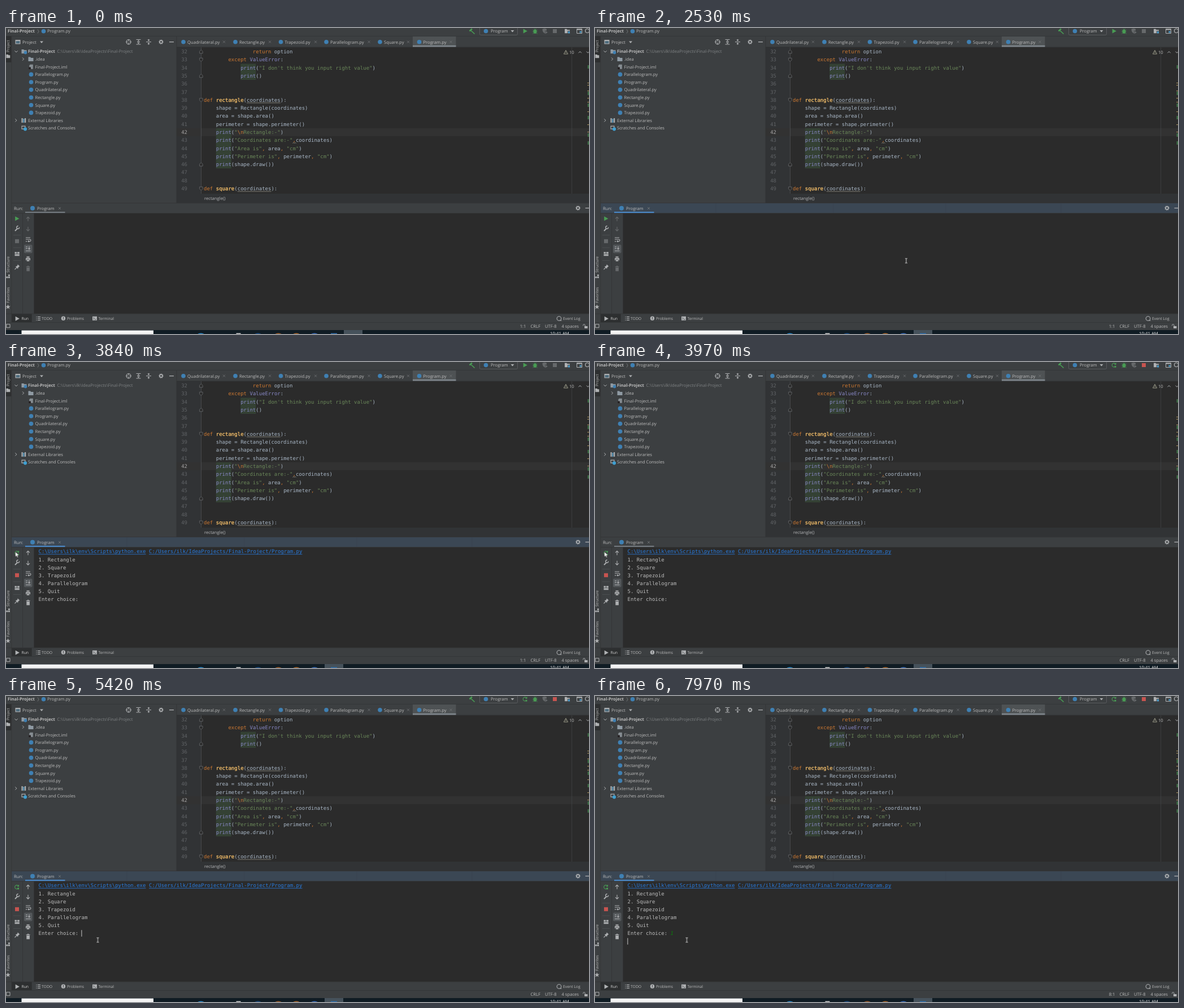
These frames come from a looping animation (1032 px wide and 543 px high, 8000 ms). An HTML page:

```html
<!DOCTYPE html>
<html lang="en">
<head>
<meta charset="utf-8">
<title>IDE run session</title>
<style>
html, body { margin: 0; width: 100%; height: 100%; overflow: hidden; background: #3c3f41; }
svg { display: block; width: 100vw; height: 100vh; }
text { white-space: pre; text-rendering: geometricPrecision; }
.ui { font-family: "Open Sans", "Noto Sans", sans-serif; }
.mono { font-family: "DejaVu Sans Mono", "Liberation Mono", monospace; }

.focus, .caret1, .caret2, .caret3, .caret4, .typed, .link, .menu, .live, .idle, .topLive, .topIdle,
.posA, .posB, .posC, .posD, .task, .press, .arrow, .beam { animation: 8s step-end infinite; }
.focus { animation-name: focus; }
.caret1 { animation-name: caret1; }
.caret2 { animation-name: caret2; }
.caret3 { animation-name: caret3; }
.caret4 { animation-name: caret4; }
.typed { animation-name: typed; }
.link, .live { animation-name: live; }
.idle { animation-name: idle; }
.menu { animation-name: menu; }
.topLive { animation-name: topLive; }
.topIdle { animation-name: topIdle; }
.posA { animation-name: posA; }
.posB { animation-name: posB; }
.posC { animation-name: posC; }
.posD { animation-name: posD; }
.task { animation-name: task; }
.press { animation-name: press; }
.arrow { animation-name: arrow; }
.beam { animation-name: beam; }
.pointer { animation: pointer 8s linear infinite; }

@keyframes focus { 0%, 49.625% { opacity: 0 } 12.875%, 66.75%, 100% { opacity: 1 } }
@keyframes caret1 { 0%, 19.25%, 31.625%, 44.375%, 100% { opacity: 0 } 12.875%, 25.5%, 38% { opacity: 1 } }
@keyframes caret2 { 0%, 72.875%, 85.625%, 100% { opacity: 0 } 66.75%, 79.25% { opacity: 1 } }
@keyframes caret3 { 0%, 98%, 100% { opacity: 0 } 85.625% { opacity: 1 } }
@keyframes caret4 { 0% { opacity: 0 } 98%, 100% { opacity: 1 } }
@keyframes typed { 0% { opacity: 0 } 85.625%, 100% { opacity: 1 } }
@keyframes live { 0% { opacity: 0 } 46.875%, 100% { opacity: 1 } }
@keyframes idle { 0% { opacity: 1 } 46.875%, 100% { opacity: 0 } }
@keyframes menu { 0% { opacity: 0 } 47.99%, 100% { opacity: 1 } }
@keyframes topLive { 0% { opacity: 0 } 48.5%, 100% { opacity: 1 } }
@keyframes topIdle { 0% { opacity: 1 } 48.5%, 100% { opacity: 0 } }
@keyframes posA { 0% { opacity: 1 } 49.625%, 100% { opacity: 0 } }
@keyframes posB { 0%, 87.5%, 100% { opacity: 0 } 68.25% { opacity: 1 } }
@keyframes posC { 0%, 99.6%, 100% { opacity: 0 } 87.5% { opacity: 1 } }
@keyframes posD { 0% { opacity: 0 } 99.6%, 100% { opacity: 1 } }
@keyframes task { 0% { transform: none } 13.24%, 100% { transform: translateX(-34px) } }
@keyframes press { 0%, 13.875%, 44.375%, 67.7%, 100% { opacity: 0 } 12.875%, 43.375%, 66.75% { opacity: 1 } }
@keyframes arrow { 0%, 55.8%, 100% { opacity: 0 } 38.5% { opacity: 1 } }
@keyframes beam { 0%, 55.8%, 100% { opacity: 1 } 38.5% { opacity: 0 } }
@keyframes pointer {
  0%, 6.2% { transform: translate(1040px, 556px) }
  8.875%, 22.5% { transform: translate(682px, 442.5px) }
  23.625%, 31.625% { transform: translate(553px, 413.5px) }
  33.75%, 36.625% { transform: translate(186px, 331px) }
  38.75% { transform: translate(34px, 330px) }
  41.25%, 54.75% { transform: translate(16.5px, 336.5px) }
  58.375% { transform: translate(131px, 414px) }
  62.625%, 100% { transform: translate(162.5px, 433px) }
}
</style>
</head>
<body>
<svg id="stage" viewBox="0 0 1032 543" xmlns="http://www.w3.org/2000/svg"></svg>
<script>
const PANEL = '#3c3f41', EDITOR = '#2b2b2b', LINE = '#323435', ICON = '#afb1b3',
      DIM = '#66696b', GREEN = '#499c54', RED = '#c75450', BLUE = '#3f80b3';
const CELL = 5.43;   // advance of one code character
const out = [];
const add = s => out.push(s);

const rect = (x, y, w, h, fill, extra = '') =>
  add(`<rect x="${x}" y="${y}" width="${w}" height="${h}" fill="${fill}" ${extra}/>`);
const path = (d, stroke = ICON, w = 1, fill = 'none') =>
  add(`<path d="${d}" stroke="${stroke}" stroke-width="${w}" fill="${fill}"/>`);
const shape = (d, fill = ICON) => path(d, 'none', 0, fill);
const dot = (x, y, r, fill) => add(`<circle cx="${x}" cy="${y}" r="${r}" fill="${fill}"/>`);
const ring = (x, y, r, stroke = ICON, w = 1) =>
  add(`<circle cx="${x}" cy="${y}" r="${r}" fill="none" stroke="${stroke}" stroke-width="${w}"/>`);
const group = (cls, draw) => { add(`<g class="${cls}">`); draw(); add('</g>'); };
// y is the middle of the capitals
const ui = (x, y, s, { size = 7.65, fill = '#bbbbbb', extra = '' } = {}) =>
  add(`<text class="ui" x="${x}" y="${y + size * .36}" font-size="${size}" fill="${fill}" ${extra}>${s}</text>`);
const mono = (x, y, s, fill = '#a9b7c6', extra = '') =>
  add(`<text class="mono" x="${x}" y="${y}" font-size="9.02" fill="${fill}" ${extra}>${s}</text>`);

const cross = (x, y) => path(`M${x - 2} ${y - 2}l4 4m0-4l-4 4`, '#75787a', .8);
const minus = (x, y) => rect(x - 4, y - .6, 8, 1.3, ICON);
const down = (x, y) => shape(`M${x - 3} ${y - 1.5}h6l-3 3.6z`);
const play = (x, y, c = GREEN) => shape(`M${x - 3.3} ${y - 4}l7.2 4l-7.2 4z`, c);
const stop = (x, y, c) => rect(x - 3.5, y - 3.5, 7, 7, c);
const gear = (x, y) => {
  ring(x, y, 2.4, ICON, 1.5);
  add(`<circle cx="${x}" cy="${y}" r="3.6" fill="none" stroke="${ICON}" stroke-width="1.1" stroke-dasharray="1.5 1.327"/>`);
};
const rerun = (x, y) => {
  path(`M${x + 2.5} ${y - 2.4}a3.4 3.4 0 1 0 .6 4`, GREEN, 1.1);
  shape(`M${x + 4} ${y - 4.4}v3.6h-3.6z`, GREEN);
  rect(x + 1.2, y + 1.4, 2.8, 2.8, GREEN);
};
const arrowV = (x, y, dir, c) =>
  path(`M${x} ${y - 3.7 * dir}v${7.4 * dir}m-3 ${-3 * dir}l3 ${3 * dir}l3 ${-3 * dir}`, c, 1.1);
const folder = (x, y, c) => shape(`M${x - 4.5} ${y - 3.7}h3.6l1.2 1.4h4.2v6h-9z`, c);

function topBar() {
  rect(0, 14, 1032, .7, LINE);
  ui(3, 5.5, 'Final-Project', { extra: 'font-weight="700"' });
  path('M56 2.5l2 3.5l-2 3.5', '#7d8082', .8);
  dot(66.5, 5.8, 3.8, BLUE);
  ui(73, 5.5, 'Program.py');
  path('M823 4.5l6.5 6', GREEN, 1.7);
  path('M820.5 5.5l4.5-4', GREEN, 2.4);
  rect(838.5, -4, 67, 16.5, PANEL, 'stroke="#606365" stroke-width=".8" rx="2"');
  dot(849.5, 5.5, 3.8, BLUE);
  ui(858, 5.5, 'Program');
  down(896.5, 5.5);
  group('topIdle', () => { play(919, 5.5); stop(971.5, 5.5, DIM); });
  group('topLive', () => { rerun(918.5, 5.5); stop(971.5, 5.5, RED); });
  add(`<ellipse cx="936.5" cy="6.3" rx="2.8" ry="3.7" fill="${GREEN}"/>`);
  path('M932.5 3.5l2 1.5m6-1.5l-2 1.5m-6.3 1.7h8.3m-8 3.3l2-1.3m6 1.3l-2-1.3M934.8 1l1.2 1.6m2.4-1.6l-1.2 1.6', GREEN, .9);
  shape('M949.5 1.8l4-1l3.5 1v3h-3v5q-4.5-2-4.5-8z', DIM);
  shape('M954.5 5l4.5 2.8l-4.5 2.8z', DIM);
  folder(993.5, 5.5, ICON);
  rect(994.5, 5.5, 4, 4.5, '#4b9bc8', `stroke="${PANEL}" stroke-width=".8"`);
  path('M1010.5 2h9v7.5h-9z', ICON, 1);
  rect(1010, 1.5, 10, 2, ICON);
  rect(1015.5, 5.5, 3, 3, '#4b9bc8');
  ring(1029, 5, 3.5, ICON, 1.2);
}

function sideStripe() {
  rect(0, 14.5, 9.5, 46.5, '#2d2f30');
  rect(9.5, 14.5, .7, 507, LINE);
  [['Project', 43], ['Structure', 434], ['Favorites', 488]].forEach(([s, y]) =>
    add(`<text class="ui" font-size="6.7" fill="#bbbbbb" transform="translate(6.2 ${y}) rotate(-90)">${s}</text>`));
  shape('M.5 47h3l1 1.2h2.8v5h-6.8z');
  rect(.5, 441, 2.8, 2.8, ICON); rect(4, 441, 2.8, 2.8, ICON); rect(4, 437.5, 2.8, 2.8, ICON);
  shape('M3.5 490.5l1.2 3h3l-2.4 2l1 3.1l-2.8-1.9l-2.8 1.9l1-3.1l-2.4-2h3z');
}

function projectPane() {
  rect(16.5, 21, 9, 7.5, ICON);
  rect(17.7, 23.2, 6.6, 4.2, '#4b6a7c');
  ui(29, 24.8, 'Project');
  down(63, 25);
  ring(217, 24.7, 4, ICON, 1.1);
  path('M217 20v3.4m0 2.6v3.4m-4.7-4.7h3.4m2.6 0h3.4', ICON, 1.1);
  path('M230.5 20.5h8m-8 8.5h8m-6.5-4.3h5', ICON, 1.1);
  shape('M234.5 21.3l2 2.3h-4zM234.5 28.2l2-2.3h-4z');
  path('M248 24.7h9', ICON, 1.1);
  shape('M252.5 23.6l2.2-2.8h-4.4zM252.5 25.8l2.2 2.8h-4.4z');
  path('M252.5 19.8v2m0 6v2', ICON, 1);
  gear(274.5, 24.7);
  minus(293, 24.7);

  const row = i => 41.6 + 13.6 * i;
  path(`M15.5 ${row(0) - 1.2}l2.6 2.6l2.6-2.6`, ICON, 1);
  path(`M29 ${row(1) - 2.7}l2.6 2.6l-2.6 2.6`, ICON, 1);
  path(`M16.3 ${row(9) - 2.7}l2.6 2.6l-2.6 2.6`, ICON, 1);
  folder(32, row(0), '#8f9aa3');
  dot(34.5, row(0) + 2, 2.8, BLUE);
  ui(39, row(0), 'Final-Project', { extra: 'font-weight="700"' });
  ui(90.5, row(0), 'C:\\Users\\ilk\\IdeaProjects\\Final-Project', { fill: '#7f8284' });
  folder(44, row(1), '#8f9aa3');
  ui(51.5, row(1), '.idea');
  shape(`M42.8 ${row(2) - 4}h5v8h-6.6v-6.4z`, '#868d92');
  rect(40.3, row(2) + .7, 3.6, 3.6, '#231f20');
  ui(51.5, row(2), 'Final-Project.iml');
  ['Parallelogram', 'Program', 'Quadrilateral', 'Rectangle', 'Square', 'Trapezoid'].forEach((s, i) => {
    dot(44.5, row(i + 3), 3.8, BLUE);
    ui(51.5, row(i + 3), s + '.py');
  });
  [27.5, 30.3, 33.1].forEach((x, i) => rect(x, row(9) - 4 + i % 2, 2.1, 8 - i % 2, i == 1 ? '#5a9cc2' : ICON));
  ui(39, row(9), 'External Libraries');
  path(`M28 ${row(10) - 3.5}h6v5h-6z`, ICON, 1.1);
  dot(34, row(10) + 1.7, 3.1, '#3f9fd0');
  ui(39, row(10), 'Scratches and Consoles');
  rect(301.5, 14.5, .8, 296, LINE);
}

function tabs() {
  rect(302, 33.5, 730, .8, LINE);
  rect(720, 15, 76.5, 18.5, '#4e5254');
  rect(720, 30.8, 76.5, 2.6, '#7f868c');
  [['Quadrilateral', 314, 386], ['Rectangle', 406, 467], ['Trapezoid', 486.5, 548],
   ['Parallelogram', 567, 642.5], ['Square', 662, 712], ['Program', 731.5, 787.5]].forEach(([s, x, end]) => {
    dot(x, 24.8, 3.8, BLUE);
    ui(x + 7, 24.8, s + '.py');
    cross(end, 24.6);
  });
}

const CODE = {
  32: '                return option',
  33: '        except ValueError:',
  34: '            print("I don\'t think you input right value")',
  35: '            print()',
  38: 'def rectangle(coordinates):',
  39: '    shape = Rectangle(coordinates)',
  40: '    area = shape.area()',
  41: '    perimeter = shape.perimeter()',
  42: '    print("\\nRectangle:-")',
  43: '    print("Coordinates are:-",coordinates)',
  44: '    print("Area is", area, "cm")',
  45: '    print("Perimeter is", perimeter, "cm")',
  46: '    print(shape.draw())',
  49: 'def square(coordinates):'
};
const tint = (s, c, extra = '') => `<tspan fill="${c}" ${extra}>${s}</tspan>`;
const paint = s => s.replace(/"[^"]*"|\b(?:def|return|except)\b|\b(?:print|ValueError)\b|(?<=def )\w+|,/g, m => {
  if (m[0] == '"') return tint(m.replace('\\n', tint('\\n', '#cc7832')), '#6a8759');
  if (m == ',' || /^(def|return|except)$/.test(m)) return tint(m, '#cc7832');
  if (/^(print|ValueError)$/.test(m)) return tint(m, '#8888c6');
  return tint(m, '#ffc66d', 'stroke="#ffc66d" stroke-width=".25"');
});

function editor() {
  const mid = n => 42 + (n - 32) * 14.29, col = n => 350 + n * CELL;
  rect(302, 34.3, 730, 260, EDITOR);
  rect(302, 34.3, 43, 260, '#313335');
  rect(302, mid(42) - 7.1, 730, 14.2, '#323232');
  rect(col(12), mid(34) - 7.1, CELL * 5, 28.5, '#344134');
  rect(col(4), mid(42) - 7.1, CELL * 5, 71.4, '#344134');
  rect(345, 34.3, .8, 260, '#505254');
  rect(1001.3, 34.3, .8, 260, '#424446');
  for (let n = 32; n < 50; n++) {
    mono(321, mid(n) + 3.1, n, n == 42 ? '#a4a3a3' : '#606366', 'text-anchor="end"');
    if (CODE[n]) mono(350, mid(n) + 3.1, paint(CODE[n]));
  }
  [[32, -1], [33, 1], [35, -1], [38, 1], [46, -1], [49, 1]].forEach(([n, d]) =>
    path(`M342.6 ${mid(n) - 3 * d}h5.6v${3.6 * d}l-2.8 ${2.6 * d}l-2.8 ${-2.6 * d}z`, '#6a6d6f', .8, EDITOR));
  [[38, 14], [49, 11]].forEach(([n, c]) => rect(col(c), mid(n) + 4.7, CELL * 11, .9, '#8b8a80'));
  path(`M${col(29)} ${mid(43) + 5.6}l1.5-1.5l1.5 1.5l1.5-1.5l1.5 1.5`, '#9a9a8e', .8);

  path('M991 39.5l3.6 6.6h-7.2z', '#9a9a88', 1);
  path('M991 42v2.3', '#9a9a88', .9);
  ui(997, 43, '10');
  path('M1013.5 44.3l2.6-2.6l2.6 2.6', ICON, 1);
  path('M1027.5 41.7l2.6 2.6l2.6-2.6', ICON, 1);
  [69, 116, 137, 159, 190, 204].forEach(y => rect(1029.5, y - 3, 2.5, 6, '#3d6b45'));
  [97, 101, 111, 124, 131, 148, 171, 184].forEach(y => rect(1029, y, 3, 1.1, '#a08a5a'));

  rect(302, 294, 730, 16.5, '#313335');
  ui(351, 302.7, 'rectangle()', { fill: '#b4b6b8' });
  rect(10, 310.3, 1022, .8, LINE);
}

function runPane() {
  rect(34, 326, 70.5, 2.4, '#747a80');
  group('focus', () => {
    rect(10.2, 311, 1021.8, 17.4, '#3b4754');
    [213.5, 421.5, 620.5, 824.5].forEach(x => rect(x, 311, .8, 17.4, '#38434f'));
    rect(34, 326, 70.5, 2.4, '#4a88c7');
  });
  ui(14, 319.8, 'Run:');
  dot(47, 319.8, 4, BLUE);
  ui(55, 319.8, 'Program');
  cross(95, 320);
  gear(1012.5, 319.5);
  minus(1029.5, 319.5);
  rect(10, 328.4, 1022, .8, LINE);
  rect(49.5, 329, 982.5, 177.8, EDITOR);
  rect(29.2, 329, .8, 178, LINE);
  [367, 389.5, 412].forEach(y => rect(13, y, 13, .7, '#515557'));

  path('M16 360l4.2-4.2', ICON, 1.9);
  path('M23.6 353.6a2.4 2.4 0 1 1-2-2.2', ICON, 1.5);
  rect(15.5, 397.5, 3.6, 3, ICON); rect(20, 397.5, 3.8, 3, ICON); rect(15.5, 401.4, 8.3, 3, ICON);
  shape('M20.5 419.2l3.8 3.8l-1.2.6l-1.7 1.7l-.3 2.2l-4.4-4.4l2.2-.3l1.7-1.7z');
  path('M15.5 428.5l3.6-3.6', ICON, 1.1);

  rect(32, 384.5, 14.5, 15, '#54585b', 'rx="2"');
  path('M35 372h8m-8 3h7q2 0 2 1.8t-2 1.8h-2.5m-4.5 0h2', ICON, 1.1);
  shape('M38 378.6l2.6-2v4z');
  path('M35 388.5h3m-3 3h3m-3 4h8.5M41 387.5v5', ICON, 1.1);
  shape('M38.8 391h4.4l-2.2 2.8z');
  rect(35, 408.3, 8, 4, ICON); rect(36.5, 405.5, 5, 2, ICON); rect(36.5, 411, 5, 3.2, ICON, `stroke="${PANEL}" stroke-width=".7"`);

  const trash = c => { rect(35.7, 423, 6.8, 1.2, c); rect(37.8, 422, 2.6, 1, c); rect(36.3, 425, 5.6, 6.5, c); };
  group('idle', () => {
    play(19.5, 338.3); stop(19.5, 378.3, DIM);
    arrowV(39, 339, -1, DIM); arrowV(39, 356.5, 1, DIM); trash(DIM);
  });
  group('live', () => {
    rerun(19, 339); stop(19.5, 378.3, RED);
    arrowV(39, 339, -1, ICON); arrowV(39, 356.5, 1, ICON); trash(ICON);
  });

  const base = i => 339.4 + 14.17 * i, left = 57.5;
  group('link', () => {
    const links = ['C:\\Users\\ilk\\env\\Scripts\\python.exe', 'C:/Users/ilk/IdeaProjects/Final-Project/Program.py'];
    links.forEach((s, i) => {
      const x = left + i * 36 * CELL;
      mono(x, base(0), s, '#287bde');
      rect(x, base(0) + 1.3, s.length * CELL, .8, '#287bde');
    });
  });
  group('menu', () =>
    ['1. Rectangle', '2. Square', '3. Trapezoid', '4. Parallelogram', '5. Quit', 'Enter choice: ']
      .forEach((s, i) => mono(left, base(i + 1), s, '#bbbbbb')));
  group('typed', () => mono(left + 14 * CELL, base(6), '1', '#0a7f0a', 'font-style="italic"'));
  [[0, 0], [14, 6], [15, 6], [0, 7]].forEach(([c, r], i) =>
    rect(left + c * CELL - .2, base(r) - 9.1, 1.1, 11.6, '#bbbbbb', `class="caret${i + 1}"`));
}

function bottomBars() {
  const small = { size: 6.8 };
  rect(0, 506.8, 1032, .7, LINE);
  rect(10.2, 507.5, 35.5, 14.5, '#2d2f30');
  play(20, 515.8, ICON);
  ui(27.5, 516, 'Run', { size: 6.8, fill: '#d0d0d0' });
  path('M53.5 512.7h1m1.5 0h5m-7.5 2.8h1m1.5 0h5m-7.5 2.8h1m1.5 0h5', ICON, 1.2);
  ui(63, 516, 'TODO', small);
  dot(101.5, 515.3, 3.7, ICON);
  path('M101.5 513v2.8m0 .8v1', PANEL, 1.1);
  ui(108, 516, 'Problems', small);
  rect(153, 511.8, 8, 7, ICON);
  path('M154.5 513.5l1.8 1.8l-1.8 1.8m3 0h2', PANEL, .9);
  ui(163.5, 516, 'Terminal', small);
  ring(979, 515.5, 3.8, ICON, 1.1);
  path('M980.5 519h3', ICON, 1.1);
  ui(986, 516, 'Event Log', small);
  rect(0, 522, 1032, .7, LINE);

  path('M.7 525.7h6.3v6h-6.3z', ICON, 1);
  [['posA', '1:1'], ['posB', '7:15'], ['posC', '7:16'], ['posD', '8:1']].forEach(([cls, s]) =>
    group(cls, () => ui(920.5, 529.2, s, { extra: 'text-anchor="end"' })));
  ui(928.5, 529.2, 'CRLF');
  ui(954, 529.2, 'UTF-8');
  ui(983.5, 529.2, '4 spaces');
  rect(1024, 529, 5.5, 4, ICON);
  path('M1025 529v-1.5a1.7 1.7 0 0 0-3.4 0v1', ICON, 1);

  rect(0, 536, 1032, 7, '#101c24');
  rect(27.5, 536.6, 233.5, 6.4, '#f4f4f4');
  rect(598, 536, 33, 7, '#46525b', 'class="task"');
  [[345, '#2f8fd0'], [446, '#1d4f8a'], [482, '#a5602a'], [514, '#b06a2c'], [546, '#3d6fc0']].forEach(([x, c]) =>
    add(`<ellipse cx="${x}" cy="544" rx="6" ry="2.6" fill="${c}"/>`));
  rect(407.5, 541.5, 8, 1.5, '#cccccc');
  rect(575, 541.6, 11, 1.4, '#2f6fae');
  ui(963, 542.3, '10:41 AM', { fill: '#f0f0f0', size: 7.8 });
}

function pointer() {
  group('pointer', () => {
    group('press', () => dot(0, 0, 8.2, '#a6a31a'));
    group('beam', () => path('M-2-4h1.4q.6 0 .6.6q0-.6.6-.6h1.4M0-3.4v6.8M-2 4h1.4q.6 0 .6-.6q0 .6.6.6h1.4', '#e6e6e6', .9));
    group('arrow', () => path('M0 0v9.4l2.2-2l1.5 3.4l1.6-.7l-1.5-3.3h2.9z', '#111111', .6, '#ffffff'));
  });
}

[topBar, sideStripe, projectPane, tabs, editor, runPane, bottomBars, pointer].forEach(draw => draw());
document.getElementById('stage').innerHTML = out.join('');
</script>
</body>
</html>
```
